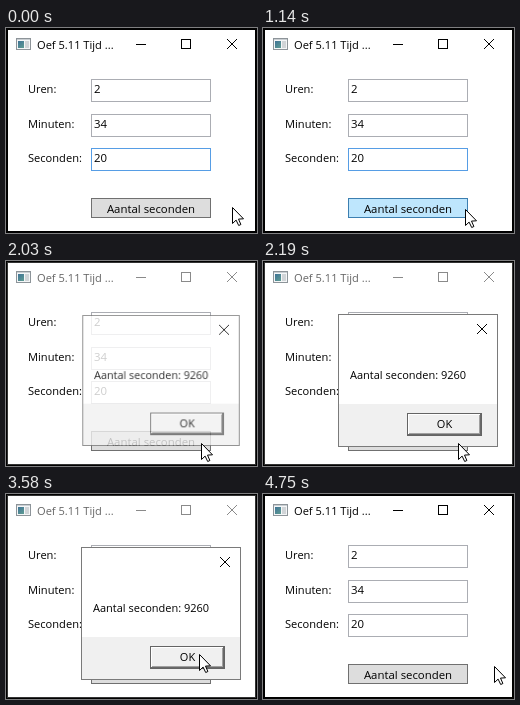
An HTML page with a canvas that plays this animation: 251x205 px, repeating every 6370 ms.

```html
<!DOCTYPE html>
<html lang="nl">
<head>
<meta charset="utf-8">
<title>Oef 5.11 Tijd</title>
<style>
  html, body { margin: 0; width: 100%; height: 100%; overflow: hidden; background: #fff; }
  canvas { display: block; width: 251px; height: 205px; }
</style>
</head>
<body>
<canvas id="stage" width="251" height="205"></canvas>
<script>
const stage = document.getElementById('stage');
const screen = stage.getContext('2d');
const layer = Object.assign(document.createElement('canvas'), { width: 251, height: 205 });
const layerCtx = layer.getContext('2d');
let ctx = screen;

const FONT = '"Open Sans", "Noto Sans", sans-serif';
const LOOP = 6370;
const HOVER = 1140, PRESS = 1780, OPEN = 1890, OK_PRESS = 4050, CLOSE = 4190;

const during = (t, from, to) => t >= from && t < to;
const mix = (a, b, p) => a + (b - a) * p;

// Eased progress 0..1 in held steps: the first shows at start, the last at end
function progress(t, start, end, steps) {
  if (t < start) return 0;
  const done = Math.floor((t - start) / (end - start) * (steps - 1) + 0.2) + 1;
  return Math.sin(Math.min(1, done / steps) * Math.PI / 2);
}

function fill(x, y, w, h, color) {
  ctx.fillStyle = color;
  ctx.fillRect(x, y, w, h);
}

function box(x, y, w, h, border, inside) {
  fill(x, y, w, h, border);
  fill(x + 1, y + 1, w - 2, h - 2, inside);
}

function text(str, x, y, size = 11.4, color = '#000', align = 'left') {
  ctx.font = `${size}px ${FONT}`;
  ctx.textAlign = align;
  ctx.fillStyle = color;
  ctx.fillText(str, x, y);
}

function cross(x, y, color) {
  ctx.strokeStyle = color;
  ctx.lineWidth = 1;
  ctx.beginPath();
  ctx.moveTo(x, y);
  ctx.lineTo(x + 10, y + 10);
  ctx.moveTo(x + 10, y);
  ctx.lineTo(x, y + 10);
  ctx.stroke();
}

function titleBar(active) {
  const glyph = active ? '#000' : '#8a8a8a';
  box(10, 10, 15, 12, '#8d9499', '#f4f6f7');
  fill(11, 11, 13, 1, '#c9ced2');
  const shade = ctx.createLinearGradient(12, 13, 18, 20);
  shade.addColorStop(0, '#3f7396');
  shade.addColorStop(1, '#5f9c92');
  fill(12, 13, 6, 7, shade);
  fill(19, 13, 4, 7, '#d0d4d7');
  text('Oef 5.11 Tijd ...', 31, 21, 11.1, active ? '#000' : '#666');
  fill(130, 16, 10, 1, glyph);
  box(175, 11, 10, 10, glyph, '#fff');
  cross(221, 11, glyph);
}

function field(label, value, y, focused) {
  text(label, 22, y + 14, 11.1);
  box(85, y, 120, 23, focused ? '#569de5' : '#abadb3', '#fff');
  text(value, 88, y + 14);
}

function mainButton(t) {
  let [border, inside] = ['#707070', '#dddddd'];
  if (during(t, HOVER, PRESS)) [border, inside] = ['#3c7fb1', '#bee6fd'];
  if (during(t, PRESS, OPEN)) [border, inside] = ['#2c628b', '#c4e5f6'];
  box(85, 170, 120, 20, border, inside);
  text('Aantal seconden', 145, 185, 11.4, '#000', 'center');
}

function mainWindow(t) {
  const active = !during(t, OPEN, CLOSE);
  const focused = t < PRESS;
  const caret = focused && Math.floor((t + 110) / 550) % 2 === 1;
  fill(0, 0, 251, 205, '#000');
  box(1, 1, 249, 203, active ? '#000' : '#333', '#fff');
  titleBar(active);
  field('Uren:', '2', 51);
  field('Minuten:', '34', 86);
  field('Seconden:', '20', 120, focused);
  if (caret) fill(100, 121, 1, 16, '#000');
  mainButton(t);
}

function okButton(pressed) {
  box(144, 152, 75, 23, '#646464', '#f0f0f0');
  if (pressed) {
    box(145, 153, 73, 21, '#a0a0a0', '#f0f0f0');
  } else {
    fill(145, 153, 73, 21, '#696969');
    fill(145, 153, 72, 20, '#fff');
    fill(146, 154, 71, 19, '#a0a0a0');
    fill(146, 154, 70, 18, '#f0f0f0');
  }
  const shift = pressed ? 1 : 0;
  text('OK', 181.5 + shift, 167 + shift, 11, '#000', 'center');
}

function messageBox(t) {
  const alpha = progress(t, OPEN, 2190, 5) - progress(t, 4290, 4450, 3);
  if (alpha <= 0) return;

  // Drawn apart so that the whole box fades as one
  ctx = layerCtx;
  box(75, 53, 160, 133, '#7a7a7a', '#fff');
  fill(76, 143, 158, 42, '#f0f0f0');
  if (t < CLOSE) cross(214, 63, '#000');
  text('Aantal seconden: 9260', 87, 118, 11);
  okButton(during(t, OK_PRESS, CLOSE));
  ctx = screen;

  const scale = mix(0.92, 1, alpha);
  ctx.save();
  ctx.globalAlpha = alpha;
  ctx.translate(155, 119.5);
  ctx.scale(scale, scale);
  ctx.drawImage(layer, -155, -119.5);
  ctx.restore();
}

function pointerAt(t) {
  const toButton = progress(t, 910, 1380, 7);
  const toOk = progress(t, 3080, 3580, 7);
  const away = progress(t, 4290, 4750, 7);
  const bow = 2 * Math.sin(toOk * Math.PI);
  return [
    226 - 31 * toButton - 2 * toOk - bow + 38 * away,
    179 + 3 * toButton - 22 * toOk + 12 * away
  ].map(Math.round);
}

function pointer(t) {
  const [x, y] = pointerAt(t);
  if (during(t, PRESS, OPEN) || during(t, OK_PRESS, CLOSE)) {
    ctx.fillStyle = 'rgba(232, 224, 0, 0.55)';
    ctx.beginPath();
    ctx.arc(x, y, 12.5, 0, 2 * Math.PI);
    ctx.fill();
  }
  ctx.save();
  ctx.translate(x + 0.5, y + 0.5);
  ctx.beginPath();
  for (const p of [[0, 0], [0, 16], [3.6, 12.6], [6.2, 18], [8.4, 17], [6, 11.6], [11, 11.3]])
    ctx.lineTo(...p);
  ctx.closePath();
  ctx.fillStyle = '#fff';
  ctx.fill();
  ctx.strokeStyle = '#000';
  ctx.lineWidth = 1;
  ctx.stroke();
  ctx.restore();
}

function draw() {
  const t = performance.now() % LOOP;
  mainWindow(t);
  messageBox(t);
  pointer(t);
  requestAnimationFrame(draw);
}
draw();
</script>
</body>
</html>
```
